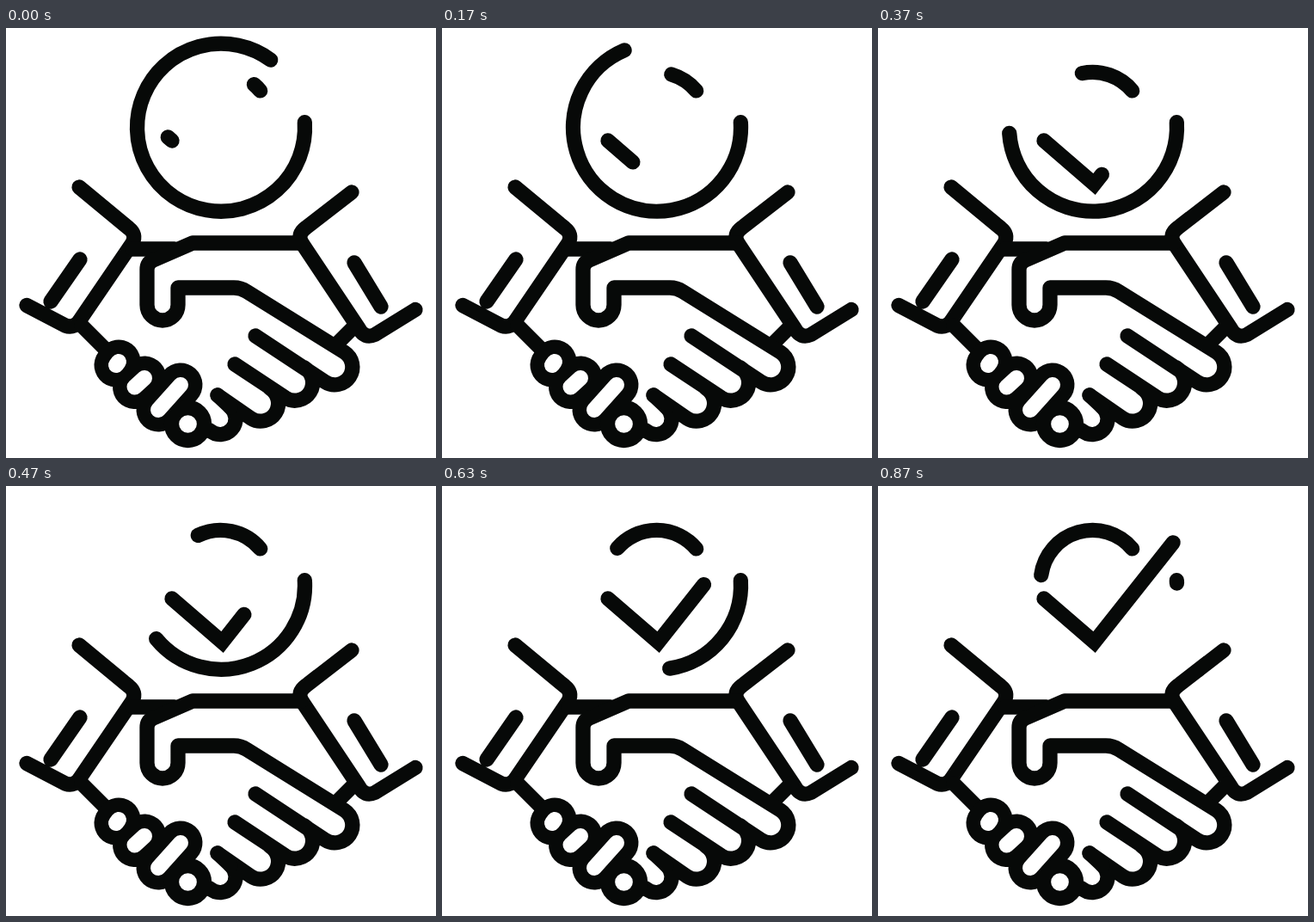
An HTML page that plays this animation: 500x500 px, repeating every 1160 ms.

```html
<!DOCTYPE html>
<html lang="en">
<head>
<meta charset="utf-8">
<title>Handshake</title>
<style>
  html, body { margin: 0; height: 100%; overflow: hidden; background: #fff; }
  svg { display: block; width: 100vw; height: 100vh; }
  path, circle, use { fill: none; stroke-linecap: round; }
  svg { stroke: #070908; stroke-width: 17.3; stroke-linejoin: round; }
  #check { stroke-linejoin: miter; }
  .knuckles { stroke-width: 51; }
  .holes { stroke: #fff; stroke-width: 18; }
</style>
</head>
<body>
<svg viewBox="0 0 500 500">
  <defs>
    <path id="grip" d="M128 392L131 388M149.5 417.5L161 407M177 444L203 415"/>
  </defs>

  <!-- sleeves and buttons -->
  <path d="M85 185L143 233Q152 240 147 250L87 338Q80 350 69 346L24 322.5M86 269L52 318"/>
  <path d="M402 191L349 232Q338 240 344 250L410 349Q417 362 429 356.5L476 327.5M405 273L436 324"/>

  <!-- wrists -->
  <path d="M88 346L114 372M406 346L386 366M147 257H196"/>

  <!-- thumb, back of the hand and four fingertips -->
  <path d="M344 250H217L171 270Q164 273 164 281V322A18 18 0 0 0 200 322V302H265Q273 302 280 306.5
    L393.5 377A20 20 0 0 1 371 411.5L290 358
    M347 395A20 20 0 0 1 325 430L266 391
    M307 419A20 20 0 0 1 285 454L246 427
    M261 441A17 17 0 0 1 237 468"/>
  <path d="M246 427L261 441"/>

  <!-- gripping fingers -->
  <use href="#grip" class="knuckles"/>
  <circle cx="211.5" cy="460.5" r="19"/>
  <use href="#grip" class="holes"/>

  <path id="ring"/>
  <path id="arc"/>
  <path id="check"/>
</svg>
<script>
  const LOOP = 1160, LAST = 26;
  const [ring, arc, check] = ['ring', 'arc', 'check'].map(id => document.getElementById(id));

  // Counter-clockwise arc between two angles in degrees, from > to
  function arcPath(cx, cy, r, from, to) {
    const at = deg => {
      const a = deg * Math.PI / 180;
      return `${cx + r * Math.cos(a)} ${cy + r * Math.sin(a)}`;
    };
    return `M${at(from)}A${r} ${r} 0 ${from - to > 180 ? 1 : 0} 0 ${at(to)}`;
  }

  const start = [193, 131], corner = [251.5, 181.5], end = [343, 66];
  const dist = (p, q) => Math.hypot(q[0] - p[0], q[1] - p[1]);
  const along = (p, q, len) => p.map((v, i) => v + (q[i] - v) * len / dist(p, q));

  function checkPath(len) {
    const short = dist(start, corner);
    return len < short
      ? `M${start}L${along(start, corner, len)}`
      : `M${start}L${corner}L${along(corner, end, len - short)}`;
  }

  function draw() {
    // 30 steps a second on a 10 ms clock, then a hold
    const tick = Math.floor(performance.now() % LOOP / 10);
    const n = Math.min(LAST, Math.floor(tick * 0.3 + 0.15));
    ring.setAttribute('d', arcPath(250, 115.7, 97.5, -53.7 - 11.84 * n, -363.5));
    arc.setAttribute('d', arcPath(249.5, 111.7, 60.3, -40, -49.8 - 4.71 * n));
    check.setAttribute('d', checkPath(8.89 * n - 6.3));
    requestAnimationFrame(draw);
  }
  draw();
</script>
</body>
</html>
```
